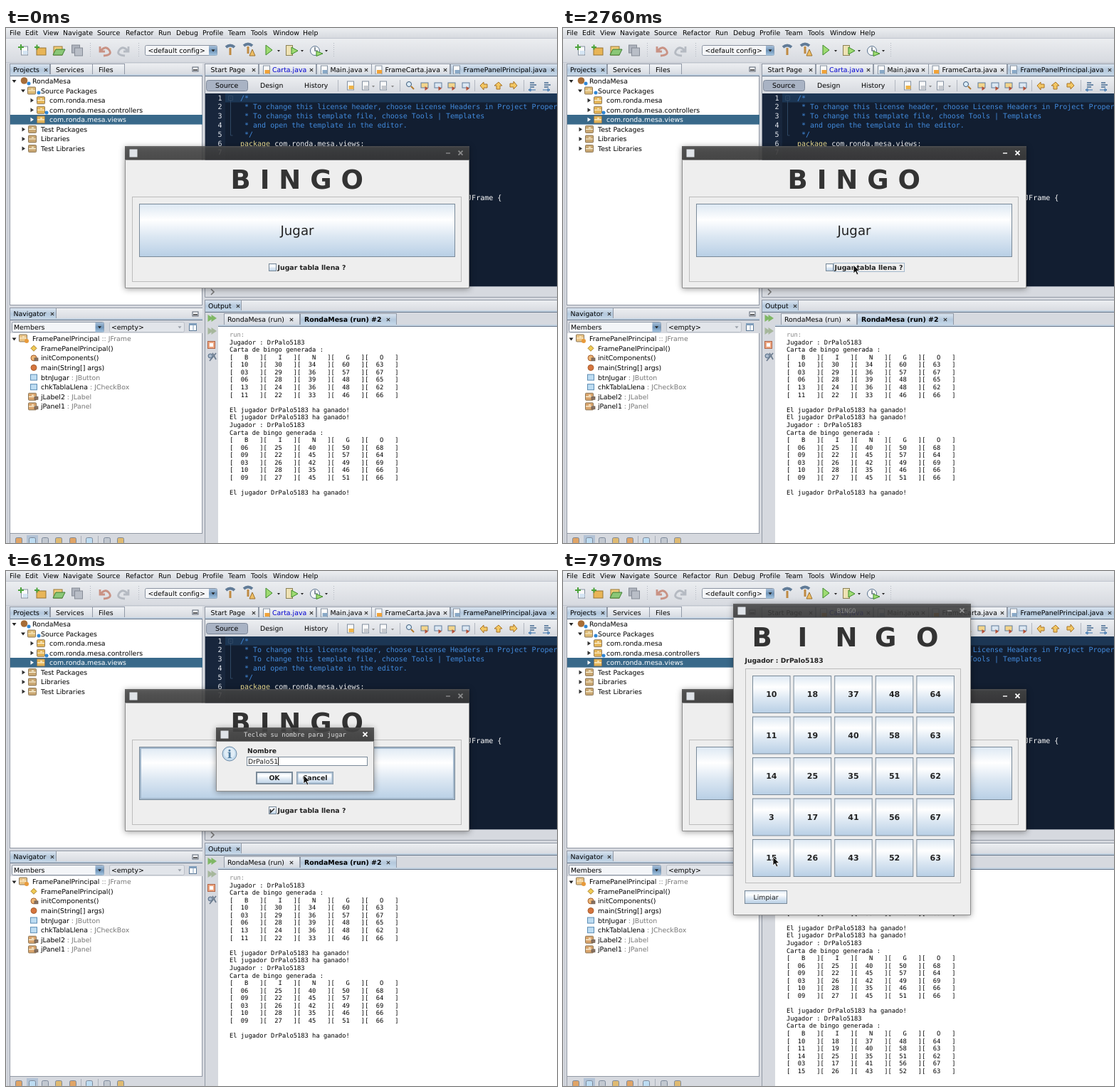
An HTML page for the animation above (8000 ms loop, 774 by 724 pixels).

```html
<!DOCTYPE html>
<html lang="es">
<head>
<meta charset="utf-8">
<title>Bingo</title>
<style>
html, body { margin: 0; width: 100%; height: 100%; overflow: hidden; background: #d6d9df; }
svg { display: block; width: 100vw; height: 100vh; }
text { font: 9.38px "DejaVu Sans", sans-serif; white-space: pre; text-rendering: geometricPrecision; }
.mono { font-family: "DejaVu Sans Mono", monospace; }
.win { filter: drop-shadow(0 1px 4px rgba(0, 0, 0, .4)); }
</style>
</head>
<body>
<svg id="stage" viewBox="0 0 774 724" preserveAspectRatio="none"></svg>
<script>
const LOOP = 8000;
const USER = "DrPalo5183", PROJECT = "RondaMesa", PKG = "com.ronda.mesa";
const CLASS = "FramePanelPrincipal";

// Drawing helpers
const rect = (x, y, w, h, fill, stroke = "none", more = "") =>
  `<rect x="${x}" y="${y}" width="${w}" height="${h}" fill="${fill}" stroke="${stroke}" ${more}/>`;
const text = (x, y, s, fill = "#000", style = "", more = "") =>
  `<text x="${x}" y="${y}" fill="${fill}" style="${style}" ${more}>${s.replace(/</g, "&lt;")}</text>`;
const mid = (x, y, s, style = "", fill = "#222") => text(x, y, s, fill, style, 'text-anchor="middle"');
const mono = (x, y, s, size, fill = "#000", more = "") =>
  text(x, y, s, fill, `font-size:${size}px`, `class="mono" ${more}`);
const path = (d, stroke, width = 1, fill = "none", more = "") =>
  `<path d="${d}" stroke="${stroke}" stroke-width="${width}" fill="${fill}" ${more}/>`;
const dot = (x, y, r, fill, stroke = "none") =>
  `<circle cx="${x}" cy="${y}" r="${r}" fill="${fill}" stroke="${stroke}"/>`;
const group = (id, body, more = "") => `<g id="${id}" ${more}>${body}</g>`;
const cross = (x, y, r = 2.2, color = "#333", w = 1.1) =>
  path(`M${x - r} ${y - r}l${2 * r} ${2 * r}m0 ${-2 * r}l${-2 * r} ${2 * r}`, color, w);
const down = (x, y, r = 2.5, fill = "#222") => path(`M${x - r} ${y - r / 2}h${2 * r}l${-r} ${r * 1.3}z`, "none", 0, fill);
const right = (x, y, r = 2.7, fill = "#333") => path(`M${x - r / 2} ${y - r}v${2 * r}l${r * 1.5} ${-r}z`, "none", 0, fill);
const gradient = (id, ...stops) => `<linearGradient id="${id}" x1="0" y1="0" x2="0" y2="1">` +
  stops.map(([o, c]) => `<stop offset="${o}" stop-color="${c}"/>`).join("") + "</linearGradient>";
const BOLD = "font-weight:bold;";

const defs = "<defs>" +
  gradient("bar", [0, "#eceef1"], [1, "#d6d9df"]) +
  gradient("tab", [0, "#f2f4f7"], [1, "#d2d7df"]) +
  gradient("tabOn", [0, "#dce6f1"], [.5, "#b4c8dc"], [1, "#c8dbec"]) +
  gradient("blue", [0, "#a7bfd8"], [.5, "#6f94b8"], [1, "#a5c6e2"]) +
  gradient("metal", [0, "#dde8f3"], [.3, "#fff"], [.6, "#dde8f3"], [1, "#b8cfe5"]) +
  gradient("title", [0, "#555"], [.15, "#444"], [1, "#3b3b3b"]) + "</defs>";

// Small icons
const page = (x, y, color) => rect(x - 4.5, y - 6, 9, 12, "#fafafa", "#8390a0") + rect(x - 2.5, y, 7, 5, color);
const block = (x, y, color) => rect(x - 5.5, y - 5, 11, 10, color, "#8d7859", 'rx="1"') + path(`M${x - 5} ${y}h10m-6-2h3`, "#fff8df", 1.2);
const lock = (x, y) => rect(x, y, 5, 4, "#8a7463", "#594b41", 'stroke-width=".6"');
const square = (x, y) => rect(x - 4.5, y - 4, 9, 8, "#bddcf2", "#5c8db4");
const lens = (x, y) => dot(x - 1, y - 2, 3.5, "#dcecf7", "#385878") + path(`M${x + 2} ${y + 1}l4 4`, "#b47b2e", 2);
const hammer = (x, y) => path(`M${x} ${y - 3}v10`, "#bf8a42", 3) + path(`M${x - 6} ${y - 4}q6-5 12 0`, "#617b97", 4);
const play = (x, y, r = 7) => path(`M${x - 4} ${y - r}v${2 * r}l9 ${-r}z`, "#3e8a2b", 1, "#9edb72");
const minimize = (x, y) => rect(x - 4, y - 3, 8, 6, "#f4f5f7", "#586271") + path(`M${x - 3} ${y + 1}h6`, "#333", 1.5);

function tab(x, w, y, label, on, tx, closeX, style = "", fill = "#000", h = 17) {
  return rect(x + .5, y + .5, w, h, on ? "url(#tabOn)" : "url(#tab)", "#929aa7") +
    text(tx, y + 12, label, fill, style) + (closeX ? cross(closeX, y + 9) : "");
}
const tabLine = (x, y, w) => rect(x, y - 1, w, 2, "#c3d2e1") + rect(x, y + 1, w, 1, "#64758a");

function toolbar() {
  const menus = { File: 5, Edit: 27, View: 52, Navigate: 80, Source: 128, Refactor: 168, Run: 214,
    Debug: 239, Profile: 276, Team: 312, Tools: 344, Window: 375, Help: 417 };
  return rect(0, 0, 774, 14, "url(#bar)") + rect(0, 14, 774, 35, "url(#bar)") +
    Object.entries(menus).map(([s, x]) => text(x, 10, s)).join("") +
    path("M0 14.5H774M0 48.5H774", "#c1c6cf") +
    page(26, 32, "#d5e5f4") + path("M17 27h8m-4-4v8", "#4ba33a", 2) +
    rect(43, 28, 13, 10, "#e8b557", "#987432") + path("M40 27h7m-3.5-3.5v7", "#4ba33a", 2) +
    rect(67, 26, 12, 12, "#f1cd78", "#9b7934") + path("M66 38l4-8h13l-4 8z", "#3d7d32", 1, "#8bc777") +
    rect(92.5, 24, 11, 11, "#aeb3bd", "#858b96") + rect(96.5, 28, 11, 11, "#b9bec7", "#858b96") +
    path("M118.5 21v21M186.5 21v21M460.5 21v21", "#b2b7c0", 1, "none", 'stroke-dasharray="1 2"') +
    path("M132 26v7h7M133 32q7-8 12-1t-8 8", "#c99284", 2.8) +
    path("M172 26v7h-7M171 32q-7-8-12-1t8 8", "#b5bac2", 2.8) +
    rect(195.5, 24.5, 101, 14, "#f5f6f8", "#8b94a2", 'rx="2"') + rect(285, 25, 11.5, 13.5, "url(#blue)") +
    down(291, 31.5) + text(199.5, 34.5, "<default config>") +
    hammer(315, 31) + hammer(340, 29) + path("M346 30l-4 9h8z", "#9b7130", 1, "#eebe64") +
    play(369, 31) + down(383, 32, 2) +
    rect(393.5, 24.5, 9, 14, "#eee2b4", "#8b8155") + play(405, 32, 5) + down(416, 32, 2) +
    dot(434, 32, 6.5, "#f4f6f8", "#58728e") + path("M434 27v5h4", "#456", 1.2) + play(440, 36, 3.5) + down(450, 32, 2);
}

function projects() {
  const rows = [[61, 36, PKG], [61, 36, PKG + ".controllers"], [61, 36, PKG + ".views"],
    [49, 24, "Test Packages"], [49, 24, "Libraries"], [49, 24, "Test Libraries"]];
  let s = rect(5.5, 50.5, 270, 339, "#fff", "#9299a5") + rect(6, 50, 270, 17, "url(#bar)") +
    tab(5, 56, 50, "Projects", true, 10, 56) + tab(62, 59, 50, "Services", false, 70) +
    tab(121, 45, 50, "Files", false, 130) + minimize(266, 58) + tabLine(6, 66, 270) +
    rect(6, 122, 270, 13.6, "#39698a") +
    down(11.5, 74.5, 3) + dot(25.5, 74, 4.8, "#a66d38") + text(37, 78, PROJECT) +
    down(24, 88, 3) + block(36, 88, "#ddba75") + dot(46, 91, 2.5, "#2f86d5") + text(49, 91.6, "Source Packages");
  rows.forEach(([x, tx, label], i) => {
    const y = 101.7 + i * 13.57, on = i === 2;
    s += right(tx, y, 3, on ? "#fff" : "#333") + block(x - 12, y, i < 3 ? "#e4b558" : "#c9a772") +
      text(x, y + 3.5, label, on ? "#fff" : "#000");
  });
  return s + dot(32, 78, 2.5, "#2f86d5") + dot(57, 119, 2.5, "#2f86d5");
}

function navigator() {
  const members = [[CLASS + "()"], ["initComponents()"], ["main(String[] args)"], ["btnJugar", "JButton"],
    ["chkTablaLlena", "JCheckBox"], ["jLabel2", "JLabel"], ["jPanel1", "JPanel"]];
  const typed = (name, type) => type ? `${name}<tspan fill="#777"> : ${type}</tspan>` : name;
  let s = rect(5.5, 393.5, 270, 335, "#fff", "#9299a5") + rect(6, 394, 270, 17, "url(#bar)") +
    tab(5, 65, 393, "Navigator", true, 10.5, 65) + minimize(266, 402) + tabLine(6, 409, 270) +
    rect(6, 411, 270, 18, "#d6d9df") +
    rect(8.5, 413.5, 129, 14, "#f3f5f8", "#8b94a2", 'rx="2"') + rect(125.5, 414, 12, 13.5, "url(#blue)") +
    down(131.5, 420.5) + text(11, 424, "Members") +
    rect(145.5, 413.5, 105, 14, "#e2e5ea", "#b9bec7", 'rx="2"') + down(244, 420.5, 2.5, "#9aa0aa") + text(148, 424, "<empty>") +
    rect(257.5, 415.5, 10, 10, "#fff", "#5b7896") + rect(257, 415, 11, 3, "#7f9dbb") + path("M263 418v8", "#7f9dbb") +
    down(11.5, 437, 3) + block(24, 436, "#e9c384") + dot(29, 440, 3, "#e89a3b") +
    `<text x="37" y="440.3">${CLASS}<tspan fill="#777"> :: JFrame</tspan></text>`;
  members.forEach(([name, type], i) => {
    const y = 450.3 + i * 13.6;
    if (i === 0) s += path(`M39 ${y - 4}l4 4-4 4-4-4z`, "#a87c25", 1, "#f0cb55");
    else if (i < 3) s += dot(39, y, 4, i === 2 ? "#d6753e" : "#edb776", "#a65d2d");
    else if (i < 5) s += square(39, y);
    else s += block(37, y, "#d9a46c");
    if (i === 1 || i > 4) s += lock(40, y);
    s += `<text x="49" y="${y + 3.5}">${typed(name, type)}</text>`;
  });
  s += rect(6, 711, 270, 13, "#d6d9df") + path("M6 710.5h270", "#9299a5") + rect(29, 713, 16, 11, "#b3c3d6");
  [18, 37, 55, 74, 94, 117, 142, 161].forEach((x, i) => {
    s += rect(x - 4.5, 716.5, 9, 9, ["#e0a466", "#bddcf2", "#c2c8d0", "#dfba72"][i % 4], "#7d899a", 'rx="2"');
  });
  return s + path("M105.5 714v10M129.5 714v10", "#aab0ba");
}

function editor() {
  const tint = ["#f0a33a", "#8aa9c7"];
  const lines = ["/*", " * To change this license header, choose License Headers in Project Properties.",
    " * To change this template file, choose Tools | Templates", " * and open the template in the editor.", " */"];
  const row = i => 101.6 + i * 12.8;
  let s = rect(280, 50, 494, 18, "url(#bar)") +
    tab(279, 75, 50, "Start Page", false, 287.5, 348) + tab(355, 80, 50, "Carta.java", false, 374, 429, "", "#0000d0") +
    tab(436, 77, 50, "Main.java", false, 455.5, 506) + tab(513, 110, 50, "FrameCarta.java", false, 532.5, 617) +
    tab(624, 160, 50, CLASS + ".java", true, 642.5, 768) +
    [366, 447, 523.5, 633].map((x, i) => page(x, 59, tint[i % 2])).join("") + tabLine(280, 66, 494) +
    rect(280, 69, 494, 23, "url(#bar)") + rect(281.5, 73.5, 58, 15, "#a9b3c4", "#7c8798", 'rx="3"') +
    text(294, 84, "Source") + text(357, 84, "Design") + text(419, 84, "History") +
    path("M466.5 73v16M553.5 73v16M658.5 73v16M727.5 73v16", "#b2b7c0");
  s += page(484, 81, "#efb44a") + page(505, 81, "#c6c9ce") + down(516, 82, 2, "#888") + page(530, 81, "#c6c9ce") + down(543, 82, 2, "#888") +
    lens(567, 81) + [588, 607, 626, 646].map((x, i) => rect(x - 5, 77, 10, 7, i % 2 ? "#dbe7f2" : "#f3d58c", "#607d9b") + right(x + 2, 85, 3, "#b55239")).join("") +
    [671, 692, 713].map((x, i) => path(`M${x - 5} 81l5-5v3h5v5h-5v3z`, "#a87529", 1, "#f3c763", i ? `transform="rotate(${i * 90} ${x} 81)"` : "")).join("") +
    [740, 760].map((x, i) => path("M0 0h6m-6 3h9m-9 3h6", "#456b91", 1.3, "none", `transform="translate(${x - 4} 77)"`) +
      path(`M${x - 6} 87h10m${i ? 0 : -10} 0l${i ? -3 : 3}-2v4z`, "#3a75b0")).join("");
  s += rect(280, 92, 494, 271, "#121e31") + rect(280, 92, 28, 271, "#18263c") + rect(308, 92, 466, 12.5, "#1c3654");
  for (let i = 0; i < 7; i++) s += mono(303.5, row(i), String(i + 1), 10, "#e4e8ef", 'text-anchor="end"');
  lines.forEach((l, i) => { s += mono(329, row(i), l, 10, "#428bdd", 'font-style="italic"'); });
  s += path("M312.5 95.5h6v6h-6zM314 98.5h3M315.5 102v49h3", "#2f4763") +
    mono(329, row(5), `package ${PKG}.views;`, 10, "#fff").replace("package", '<tspan fill="#f5e596">package</tspan>') +
    mono(329, row(11), `public class ${CLASS} extends javax.swing.JFrame {`, 10, "#fff");
  return s + rect(280, 363, 494, 15, "#d6d9df") + path("M288 367l4 4-4 4", "#777", 1.6) +
    path("M279.5 50v328.5H774M280 363.5h494", "#9299a5");
}

// Console text
const cells = "10 30 34 60 63 03 29 36 57 67 06 28 39 48 65 13 24 36 48 62 11 22 33 46 66".split(" ");
const second = "06 25 40 50 68 09 22 45 57 64 03 26 42 49 69 10 28 35 46 66 09 27 45 51 66".split(" ");
const card = "10 18 37 48 64 11 19 40 58 63 14 25 35 51 62 03 17 41 56 67 15 26 43 52 63".split(" ");
const won = `El jugador ${USER} ha ganado!`;
function report(nums) {
  const lines = [`Jugador : ${USER}`, "Carta de bingo generada :", [..."BINGO"].map(c => `[   ${c}   ]`).join("")];
  for (let r = 0; r < 5; r++) lines.push(nums.slice(r * 5, r * 5 + 5).map(n => `[  ${n}   ]`).join(""));
  return lines;
}
const logLines = (list, from) => list.map((l, i) => mono(314, 434 + (from + i) * 10.58, l, 8.77, from + i ? "#000" : "#888")).join("");

function output() {
  const old = ["run:", ...report(cells), "", won, won, ...report(second), "", won];
  return rect(279.5, 382.5, 500, 345, "#d6d9df", "#9299a5") + rect(280, 383, 494, 16, "url(#bar)") +
    tab(279, 51, 382, "Output", true, 284, 326) + tabLine(280, 398, 494) +
    tab(306, 106, 401, PROJECT + " (run)", false, 311, 401) +
    tab(413, 135, 401, PROJECT + " (run) #2", true, 419, 537, BOLD) + tabLine(298, 418, 476) +
    rect(298, 420, 476, 304, "#fff") +
    [408, 426].map((y, i) => [286, 291].map(x => right(x, y, 5, i ? "#a6b79c" : "#7fb765")).join("")).join("") +
    rect(283.5, 440.5, 10, 10, "#eda681", "#b0664a") + rect(286, 443, 5, 5, "#fff") +
    dot(287, 461, 3, "#a8b8ca", "#536a83") + path("M290 457l5 9m0-9l-9 11", "#6d7d90", 1.8) +
    `<clipPath id="logClip">${rect(298, 422, 476, 302, "#fff")}</clipPath><g clip-path="url(#logClip)">` +
    group("log", logLines(old, 0) + group("fresh", logLines(report(card), 22))) + "</g>";
}

// Windows
function frame(id, x, y, w, h, title, hasMin) {
  const body = rect(x, y + 19.5, w, h - 19.5, "#eee") +
    rect(x, y, w, 19.5, "url(#title)", "none", `id="${id}Bar" opacity=".9"`);
  return `<g class="win">${body}</g>` + rect(x + 6.5, y + 4.5, 11, 11, "#dfe3e8") +
    group(id + "Ctl", mono(x + w / 2 - (title === "BINGO" ? 8 : 0), y + 12.8, title, 8.85, "#ddd", 'text-anchor="middle"') +
      (hasMin ? path(`M${x + w - 33} ${y + 10}h6`, "#fff", 1.4) : "") + cross(x + w - 12.5, y + 9.7, 3, "#fff", 1.8)) +
    path(`M${x + .5} ${y + 20}v${h - 20.5}h${w - 1}v${20.5 - h}`, "#8d8d8d");
}
const button = (x, y, w, h, id = "") => rect(x + .5, y + .5, w - 1, h - 1, "url(#metal)", "#7a8a99", id && `id="${id}"`);

function mainWindow() {
  return frame("main", 167, 166, 484, 200, "", true) +
    text(315.6, 226.3, "B I N G O", "#333", BOLD + "font-size:37px") +
    rect(177.5, 237.5, 462, 119, "none", "#bcbcbc") + button(187, 247, 444, 75, "play") +
    rect(189, 249, 440, 71, "none", "#a3b8cc", 'id="hover" stroke-width="2"') +
    mid(409, 291.3, "Jugar", "font-size:18.2px") + button(369, 331, 11, 11) +
    path("M371.5 335v4.5l5.5-5.5", "#222", 1.5, "none", 'id="check"') +
    rect(380.5, 330.5, 99, 12, "none", "#a3b8cc", 'id="focus"') +
    text(381.5, 339.6, "Jugar tabla llena ?", "#222", BOLD);
}

function nameDialog() {
  return frame("ask", 295, 220, 222, 90, "Teclee su nombre para jugar") +
    dot(314, 257, 10, "#c6dced", "#6e8ca8") + dot(314, 256, 7.5, "#e1edf6") +
    mid(314, 263, "i", "font:bold 16px 'DejaVu Serif','DejaVu Sans',serif", "#4f7b9f") +
    text(339, 256, "Nombre", "#222", BOLD + "font-size:9.2px") + rect(338.5, 261.5, 169, 12, "#fff", "#7a8a99") +
    text(340, 271, "", "#222", "", 'id="typed"') + rect(340, 262, 1, 11, "#222", "none", 'id="caret"') +
    button(351, 282, 52, 18) + rect(352.5, 283.5, 49, 15, "none", "#7a8a99") + mid(377, 294.3, "OK", BOLD) +
    button(408, 282, 52, 18) + rect(409.5, 283.5, 49, 15, "none", "#a3b8cc", 'id="cancelHover" stroke-width="2"') +
    mid(434, 294.3, "Cancel", BOLD);
}

function cardWindow() {
  let s = [..."BINGO"].map((c, i) => text([265.6, 329.6, 382.6, 438, 496][i], 106, c, "#333", BOLD + "font-size:37px")).join("") +
    text(255.5, 129.3, `Jugador : ${USER}`, "#222", BOLD + "font-size:9.2px") + rect(256.5, 137.5, 302, 301, "none", "#bcbcbc");
  card.forEach((n, i) => {
    const x = 266 + (i % 5) * 57.6, y = 147 + Math.floor(i / 5) * 57.5;
    s += button(x, y, 53.5, 53) + mid(x + 26.8, y + 30.3, String(+n), BOLD + "font-size:11px");
  });
  return frame("card", 239, 46, 334, 438, "BINGO", true) + group("cardBody", s + button(255, 449, 60, 19) + mid(285, 462, "Limpiar"));
}

const stage = document.getElementById("stage");
stage.innerHTML = defs + rect(0, 0, 774, 724, "#d6d9df") + path("M2.5 50V724", "#bfc4cd") +
  toolbar() + projects() + navigator() + editor() + output() +
  mainWindow() + group("ask", nameDialog()) + group("card", cardWindow()) +
  group("arrow", path("M0 0v12l2.8-2.6 2 4.5 2.1-1-2-4.3h3.9z", "#fff", .8, "#111")) +
  group("beam", path("M-2.5-5q2 0 2.5 1 .5-1 2.5-1M0-4v9M-2.5 6q2 0 2.5-1 .5 1 2.5 1", "#222", 1.1));

// Motion
const track = [[730, 662, 381], [850, 600, 345], [1060, 470, 310], [1320, 470, 310], [1500, 452, 300],
  [1680, 466, 341], [1800, 458, 334], [2100, 384, 333], [2150, 384, 333], [2200, 357, 333], [2370, 357, 333],
  [2420, 408, 333], [3100, 408, 333], [3230, 418, 287], [6700, 418, 287], [6850, 471, 361], [7010, 405, 308],
  [7140, 365, 270], [7260, 332, 280], [7470, 393, 282], [7660, 393, 282], [7970, 295, 402]];
const keys = [4590, 4800, 5240, 5420, 5470, 5750, 6020, 6095, 6170, 6360];

function pointer(t) {
  const i = track.findIndex(p => p[0] > t);
  if (i < 0) return track[track.length - 1].slice(1);
  if (i === 0) return track[0].slice(1);
  const [t0, x0, y0] = track[i - 1], [t1, x1, y1] = track[i], k = (t - t0) / (t1 - t0);
  return [x0 + (x1 - x0) * k, y0 + (y1 - y0) * k];
}
const el = id => document.getElementById(id);
const show = (id, on) => el(id).setAttribute("display", on ? "inline" : "none");
const set = (id, name, value) => el(id).setAttribute(name, value);
const inside = ([x, y], l, t, r, b) => x >= l && x <= r && y >= t && y <= b;
function focusWin(id, on) {
  set(id + "Ctl", "opacity", on ? 1 : .4);
  set(id + "Bar", "opacity", on ? .9 : .86);
}

function draw(t) {
  const pos = pointer(t), asking = t >= 3610 && t < 7530, seen = t >= 730;
  const inField = asking && inside(pos, 339, 262, 507, 273);
  const pressed = t >= 3540 && t < 3610;
  set("play", "fill", pressed ? "#b8cfe5" : "url(#metal)");
  show("hover", !pressed && (t < 3540 ? seen && inside(pos, 188, 248, 630, 321) : t < 7900));
  show("check", t >= 2800);
  show("focus", t >= 2710 && t < 3610);
  focusWin("main", t >= 2710 && t < 3610 || t >= 7940);
  focusWin("card", t < 7940);

  show("ask", asking);
  const count = keys.filter(k => k <= t).length;
  const since = t - (count ? keys[count - 1] : 3700);
  el("typed").textContent = USER.slice(0, count);
  show("caret", asking && Math.floor(since / 500) % 2 === 0);
  if (asking) set("caret", "x", 340 + (count ? Math.round(el("typed").getComputedTextLength()) : 0));
  show("cancelHover", inside(pos, 408, 282, 460, 300));

  show("card", t >= 7570);
  show("cardBody", t >= 7660);
  show("fresh", t >= 7700);
  set("log", "transform", `translate(0 ${t >= 7700 ? -35 : 0})`);

  show("arrow", seen && !inField);
  show("beam", seen && inField);
  for (const id of ["arrow", "beam"]) set(id, "transform", `translate(${pos[0]} ${pos[1]})`);
}

const start = performance.now();
function tick(now) {
  draw(Math.max(0, now - start) % LOOP);
  requestAnimationFrame(tick);
}
draw(0);
requestAnimationFrame(tick);
</script>
</body>
</html>
```
